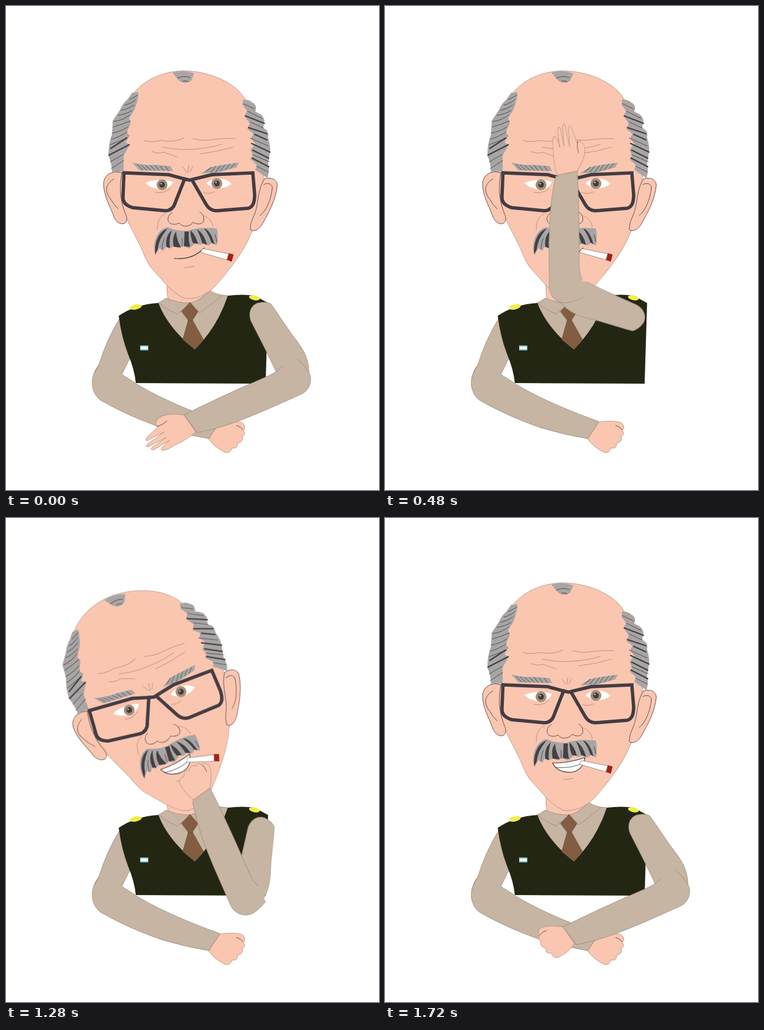
An HTML page without scripts that plays this animation: 612x792 px, repeating every 2 s.

```html
<!DOCTYPE html>
<html lang="en">
<head>
<meta charset="utf-8">
<title>Officer with a cigarette</title>
<style>
  html, body { margin: 0; width: 100%; height: 100%; overflow: hidden; background: #fff; }
  svg { display: block; width: 100%; height: 100%; }
  .skin { fill: #fac6b0; stroke: #94796c; stroke-width: .6; }
  .sleeve { fill: #c6b5a2; stroke: #8f8276; stroke-width: .7; }
  .hair { fill: #a8a6a5; }
  .line { fill: none; stroke: #a37d6c; stroke-width: .7; }
  .ink { fill: none; stroke: #40383a; stroke-width: .8; }
  .thick { fill: none; stroke: #453f42; stroke-width: 2.2; }
  .dark { fill: #453f42; }
  .ear { fill: #fac6b0; stroke: #40383a; stroke-width: .8; }

  /* 2 s loop drawn at 25 poses per second */
  .head, .upper, .fore, .open, .fist, .shut, .smile, .eye, .wink {
    animation: 2s infinite step-end;
  }
  .head { transform-origin: 297px 472px; animation-name: head; }
  .upper { transform-origin: 412.3px 504.5px; animation-name: upper; }
  .fore { transform-origin: 477px 610px; animation-name: fore; }
  .open, .shut { animation-name: early; }
  .fist, .smile { animation-name: late; }
  .eye { animation-name: blink; }
  .wink { animation-name: wink; }

  @keyframes head {
    0% { transform: rotate(0deg); }
    26% { transform: rotate(0deg); animation-timing-function: steps(7); }
    40% { transform: rotate(-19.8deg); }
    62% { transform: rotate(-19.8deg); animation-timing-function: steps(12); }
    86%, 100% { transform: rotate(0deg); }
  }
  @keyframes upper {
    0% { transform: rotate(0deg); animation-timing-function: steps(4); }
    8% { transform: rotate(46deg); animation-timing-function: steps(8); }
    24% { transform: rotate(141deg); }
    26% { transform: rotate(141deg); animation-timing-function: steps(7); }
    40%, 62% { transform: rotate(50deg); }
    64% { transform: rotate(40deg); animation-timing-function: steps(7); }
    78% { transform: rotate(18.5deg); animation-timing-function: steps(4); }
    86%, 100% { transform: rotate(0deg); }
  }
  @keyframes fore {
    0% { transform: rotate(0deg); animation-timing-function: steps(4); }
    8% { transform: rotate(-2deg); animation-timing-function: steps(8); }
    24% { transform: rotate(-27.4deg); }
    26% { transform: rotate(-27.4deg); animation-timing-function: steps(7); }
    40%, 62% { transform: rotate(54deg); }
    64% { transform: rotate(50deg); animation-timing-function: steps(7); }
    78% { transform: rotate(8.1deg); animation-timing-function: steps(4); }
    86%, 100% { transform: rotate(0deg); }
  }
  @keyframes early { 0% { visibility: visible; } 28%, 100% { visibility: hidden; } }
  @keyframes late { 0% { visibility: hidden; } 28%, 100% { visibility: visible; } }
  @keyframes blink { 0%, 54% { visibility: visible; } 40% { visibility: hidden; } 100% { visibility: visible; } }
  @keyframes wink { 0%, 54% { visibility: hidden; } 40% { visibility: visible; } 100% { visibility: hidden; } }
</style>
</head>
<body>
<svg viewBox="0 0 612 792" stroke-linejoin="round" stroke-linecap="round">
  <defs>
    <g id="fist">
      <path class="skin" d="M311 697L292 669C277 667 258 667 254 672Q249 679 254 683Q249 691 256 692Q253 702 264 704Q262 713 273 712Q275 721 284 719Q301 711 311 697Z"/>
      <path class="ink" d="M254 682Q258 677 265 675"/>
    </g>
    <g id="iris">
      <circle r="9" fill="#a28f7d"/>
      <circle r="4.8" fill="#453c3c"/>
      <circle cx="-1.5" cy="-1.8" r="1.2" fill="#ddd"/>
    </g>
  </defs>

  <!-- resting arm -->
  <path class="sleeve" d="M187 510Q164 548 152 588C137 606 138 632 155 645Q198 670 255 690Q295 702 333 708L351 680Q265 649 215 619Q204 611 190 603L205 573L212 530Z"/>
  <path class="line" d="M152 588Q148 594 146 600"/>
  <use href="#fist" transform="translate(643.5 11.5) scale(-1 1)"/>

  <!-- torso -->
  <path class="skin" d="M264 457Q263 470 267 484L302 492L334 466L330 440Z"/>
  <path class="sleeve" d="M250 486L263 478Q281 486 302 486Q322 481 334 465Q344 473 364 474Q350 530 310 562Q264 530 250 486Z"/>
  <path class="line" d="M251 486Q265 498 281 504L292 495M313 496L318 502Q338 488 354 474"/>
  <path fill="#232613" d="M185 507Q213 488 250 486Q266 527 310 562Q347 525 364 474Q388 471 408 474L430 486L426 618L213 617Q211 595 200 569Q189 540 185 507Z"/>
  <path fill="#835d41" stroke="#64462f" stroke-width=".6" d="M302 485L315 500L306 514L324 546L310 562L290 546L299 514L288 500ZM299 514H306"/>
  <ellipse cx="213" cy="492.5" rx="10" ry="4" fill="#f1ed43" transform="rotate(-13 213 492.5)"/>
  <ellipse cx="407.500" cy="477.500" rx="9" ry="3.8" fill="#f1ed43" transform="rotate(13 407.5 477.5)"/>
  <rect x="220" y="555.5" width="13.500" height="8" fill="#86cbd0"/>
  <rect x="221" y="557.500" width="11.500" height="4" fill="#fff"/>

  <g class="head">
    <path class="skin" d="M290 106C335 106 377 126 392 152Q425 205 423 275Q415 350 401 375Q388 407 349 452Q327 479 297 479Q285 478 263 456L237 427Q229 415 222 396L196 345Q176 270 188 215Q188 165 210 142C229 119 259 107 290 106Z"/>

    <!-- ears -->
    <path class="ear" d="M190 273C173 268 160 277 160 292C161 311 169 324 176 342C179 352 186 358 194 356C200 352 199 346 194 335C187 315 186 295 190 273Z"/>
    <path class="ink" d="M177 283C164 291 161 302 171 315Q176 324 184 332"/>
    <path class="ear" d="M424 283C435 279 446 284 445 295C442 319 431 338 421 356C415 367 405 370 401 366C400 352 408 345 411 330C415 308 416 295 424 283Z"/>
    <path class="ink" d="M423 292C429 289 437 290 437 298C435 316 428 334 417 343"/>

    <!-- hair -->
    <path class="hair" d="M207 142L217 141Q218 151 211 169L202 184L205 191L198 207L203 212L196 223L203 227L193 245V270L174 272Q173 255 168 245Q168 225 174 210L175 188L187 170Q191 160 200 152Z"/>
    <path class="ink" d="M203 153L216 146M195 162Q206 160 213 153M189 171Q200 169 210 162M184 179Q197 177 207 171M177 189Q193 187 203 178M176 198Q190 194 204 188M174 208Q187 206 200 198M173 218Q187 214 199 206M171 227L199 216M171 255L192 243M173 266L193 253"/>
    <path class="thick" d="M169 244L202 227M172 233L198 216"/>
    <path class="hair" d="M389 153Q400 153 404 158Q413 162 409 173Q422 177 424 187L422 200Q432 203 430 215Q435 232 433 240L430 258Q433 268 429 282L409 268L412 261L401 250L406 244L401 236L409 225L402 217L406 209L396 201L400 192L391 180L396 172L388 162Z"/>
    <path class="ink" d="M390 160L407 168M396 172L420 184M401 190L423 200M401 216L430 229M404 243L432 255M411 262L431 272"/>
    <path class="thick" d="M393 180L424 192M398 199L428 209M408 210L428 219M403 225L433 239M405 236L431 249M404 249L431 263"/>
    <path class="hair" d="M273 109Q290 104 309 110L304 122Q293 130 283 121Z"/>
    <path class="ink" d="M281 118Q292 113 302 117M290 123Q295 121 299 124"/>

    <!-- wrinkles -->
    <path class="line" d="M226 220Q240 224 253 220Q276 224 292 216M307 217Q325 222 343 218Q360 216 376 217M258 231Q288 237 312 234Q337 232 354 226M239 238Q251 243 258 239Q270 243 281 247M318 242Q345 239 372 231M290 263L296 272M300 261L298 273M306 263L302 272M245 305Q258 308 269 299M324 305Q333 309 342 304M262 340C249 345 249 356 248 367M325 343Q338 349 340 361M293 428Q301 428 309 426"/>

    <!-- brows -->
    <path class="hair" d="M207 256Q225 261 245 260L270 262L274 270L219 269Z"/>
    <path class="hair" d="M320 274L335 264Q360 259 382 256L378 264L346 273Z"/>
    <path class="ink" d="M215 259L224 268M222 260L231 269M229 261L238 269M237 261L245 269M245 261L251 269M253 262L259 270M261 262L267 270M328 271L337 264M336 272L344 262M344 272L352 261M352 270L359 260M360 268L367 259M368 266L375 258"/>

    <!-- eyes -->
    <g class="eye">
      <path fill="#fff" d="M229 290C240 283 263 284 274 288C269 299 256 303 244 298Q235 296 229 290Z"/>
      <use href="#iris" x="256" y="292.500"/>
    </g>
    <path class="wink" fill="none" stroke="#000" stroke-width="2" d="M232 291Q255 303 277 291.500"/>
    <path fill="#fff" d="M329 290C339 280 360 280 370 291C359 300 340 301 329 290Z"/>
    <use href="#iris" x="346" y="290.500"/>

    <g fill="none" stroke="#433c42" stroke-width="5.5" stroke-linejoin="miter">
      <path d="M193.500 273L267 276L293 283L278 321Q274 335 261 335L208 330Q191 325 192 312Z"/>
      <path d="M293 283L301 285L338 276L405 273L408 309Q408 329 397 331L346 335Q334 335 328 324L306 286"/>
    </g>

    <path class="ink" d="M273 338C264 342 264 353 270 356Q278 359 284 355Q288 361 297 360Q304 359 307 354Q318 360 324 353Q327 343 318 337"/>

    <!-- moustache -->
    <path class="hair" d="M245 408C239 388 249 363 266 362Q278 368 297 368Q318 361 346 364Q349 377 346 392L338 388L332 392L326 388L318 391L310 389L300 397L291 393L283 396L276 393L268 397L262 394L258 401L252 396Z"/>
    <path class="dark" d="M245 406C243 386 251 369 265 364Q250 382 249 398ZM263 394Q261 376 272 367Q267 382 269 396ZM275 394Q272 378 279 369Q280 383 287 395ZM292 393L293 369H300Q299 382 302 394ZM307 388Q302 377 303 367Q311 375 315 389ZM322 388Q318 374 313 365Q325 372 330 391ZM337 387Q333 374 325 364Q336 367 342 390Z"/>
    <path class="ink" d="M256 398Q256 388 260 380M289 393V380M346 386L343 374"/>

    <!-- mouth and cigarette -->
    <path class="shut" fill="none" stroke="#40383a" stroke-width="1.2" d="M276 413Q306 416 325 396"/>
    <g class="smile">
      <path fill="#fff" stroke="#40383a" stroke-width="1.200" d="M275 401Q303 401 328 392Q325 413 306 416Q283 417 275 401Z"/>
      <path class="ink" d="M279 408Q307 411 326 400"/>
    </g>
    <path fill="#fff" stroke="#6b5b55" stroke-width=".6" d="M323 397L368 406L364 416L319 403Z"/>
    <path fill="#b11b0c" stroke="#5a2018" stroke-width=".7" d="M366 405L373 407L370 418L363 415Z"/>
  </g>

  <!-- moving arm -->
  <g class="upper">
    <path class="sleeve" d="M443 598L427 565L402 516C397 503 401 490 413 486Q425 483 434 487L440 495L468 536C485 558 496 572 497 598Q496 624 475 632"/>
    <g class="fore">
      <g class="open">
        <path class="skin" d="M311 697L292 669C276 667 257 667 249 676C244 682 244 688 250 688L231 706Q227 711 232 711L260 697L232 717Q227 722 234 721L263 706L240 722Q235 727 243 726L268 711L256 722Q252 728 259 727Q267 726 276 719Q299 709 311 697Z"/>
        <path class="ink" d="M247 688Q257 686 264 679"/>
      </g>
      <use class="fist" href="#fist"/>
      <path class="sleeve" d="M452 591Q442 601 424 608Q350 640 292 669L314 698C370 688 424 662 485 635C497 629 502 616 499 604Q495 592 478 578"/>
    </g>
  </g>
</svg>
</body>
</html>
```
